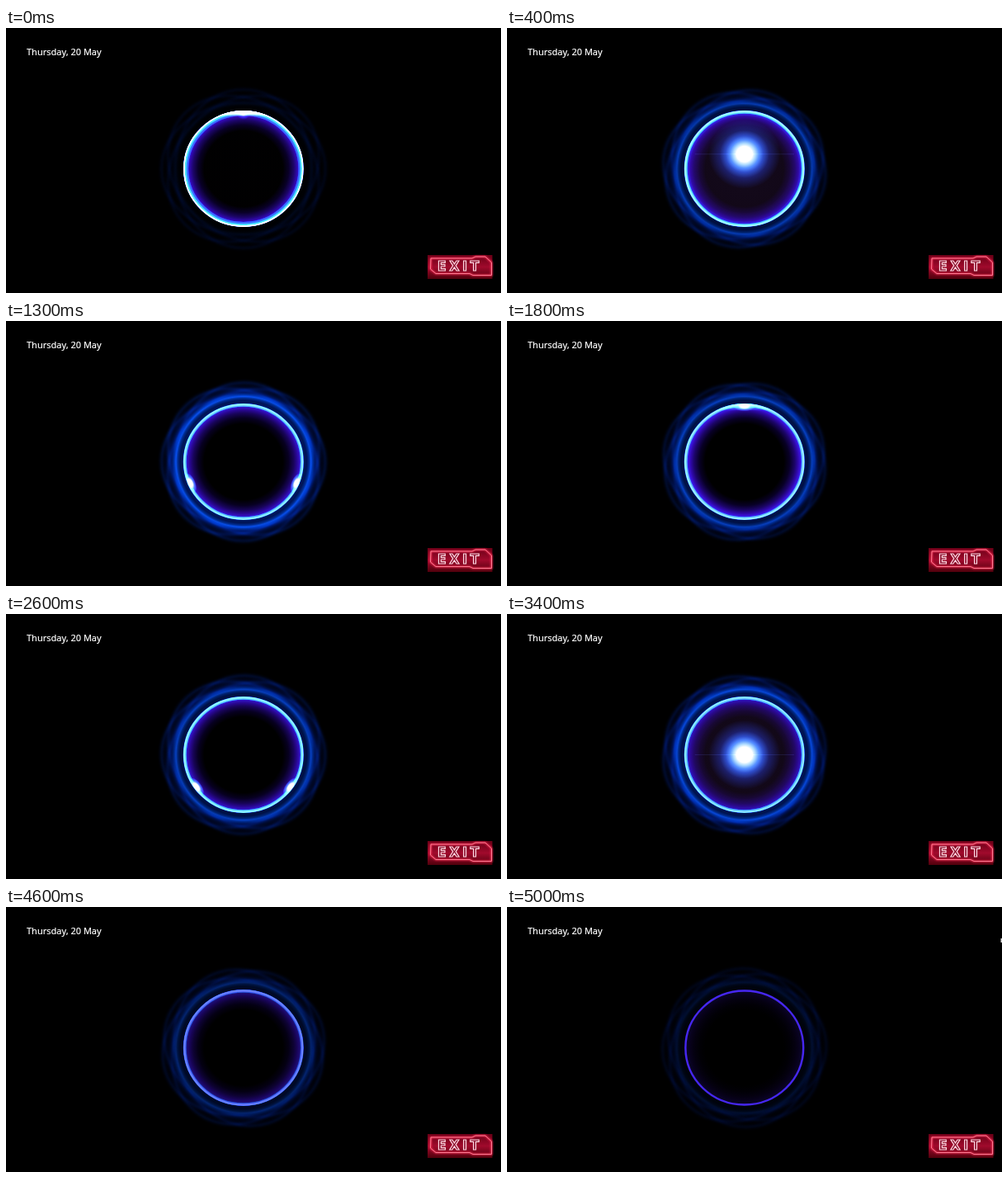
Animation, 600 px wide and 321 px high, one loop 5100 ms. Source, as an HTML page with a canvas:

```html
<!DOCTYPE html>
<html lang="en">
<head>
<meta charset="utf-8">
<title>Energy ring</title>
<style>
  html, body { margin: 0; width: 100%; height: 100%; overflow: hidden; background: #000; }
  canvas, svg { position: absolute; left: 0; top: 0; display: block; }
  .date { font: 11px "Noto Sans", "Open Sans", sans-serif; fill: #fff; stroke: #fff; stroke-width: .2; }
  .exit { font: bold 15.5px "DejaVu Sans", sans-serif; letter-spacing: 3.8px; }
</style>
</head>
<body>
<canvas id="stage" width="600" height="321"></canvas>
<svg width="600" height="321" viewBox="0 0 600 321">
  <defs>
    <linearGradient id="panel" x2="0" y2="1">
      <stop offset="0" stop-color="#6a0016"/>
      <stop offset=".5" stop-color="#a00a2c"/>
      <stop offset="1" stop-color="#50000c"/>
    </linearGradient>
    <filter id="soft"><feGaussianBlur stdDeviation="1"/></filter>
    <path id="frame" d="M515 279H565L569 277H581L588.500 284V299.500H566L562 297.500H521L514.500 292Z"/>
  </defs>
  <text class="date" x="25" y="33">Thursday, 20 May</text>
  <rect x="511" y="275" width="78.500" height="29" fill="url(#panel)"/>
  <g fill="none">
    <use href="#frame" stroke="#f02c50" stroke-width="2.2" filter="url(#soft)"/>
    <use href="#frame" stroke="#ff7a92" stroke-width="1"/>
  </g>
  <text class="exit" x="523" y="294" fill="#8d1230" stroke="#ffd9e2" stroke-width="1.2">EXIT</text>
  <rect id="cursor" x="598.500" y="38" width="1.500" height="5" fill="#ddd"/>
</svg>
<script>
const LOOP = 5100, STEP = 100, R = 70, TAU = Math.PI * 2;
const ctx = document.getElementById('stage').getContext('2d');
const cursor = document.getElementById('cursor');

// time, halo, core, glow, flash
const LEVELS = [
  [0, .03, .6, 1, 1],
  [400, .6, .95, .9, .1],
  [800, 1, .95, .75, 0],
  [1800, .65, .85, 1, 0],
  [2600, .65, .95, .85, 0],
  [3400, .75, .85, .8, 0],
  [4100, .65, .85, .95, 0],
  [5000, .12, 0, .15, 0]
];
// time, height relative to the centre, strength
const BALL = [
  [0, -68, 1], [800, 32.500, 1], [1000, 68, .8], [1100, 70, 0],
  [2900, 70, 0], [3000, 64, .8], [3400, 0, 1], [3600, 0, .8], [3900, 0, 0]
];

const clamp = (v, a = 0, b = 1) => Math.min(b, Math.max(a, v));

function sample(rows, t) {
  const i = rows.findIndex(row => row[0] > t);
  if (i < 0) return rows[rows.length - 1].slice(1);
  const a = rows[i - 1], b = rows[i], k = (t - a[0]) / (b[0] - a[0]);
  return a.slice(1).map((v, n) => v + (b[n + 1] - v) * k);
}

function layer(alpha, paint) {
  if (alpha <= 0) return;
  ctx.save();
  ctx.globalAlpha = alpha;
  paint();
  ctx.restore();
}

function circle(x, y, r) {
  ctx.beginPath();
  ctx.arc(x, y, r, 0, TAU);
}

function disc(r, stops) {
  const g = ctx.createRadialGradient(0, 0, 0, 0, 0, r);
  for (const [at, color] of stops) g.addColorStop(at / r, color);
  ctx.fillStyle = g;
  circle(0, 0, r);
  ctx.fill();
}

function ring(r, width, color) {
  ctx.lineWidth = width;
  ctx.strokeStyle = color;
  circle(0, 0, r);
  ctx.stroke();
}

function halo(level, turn) {
  layer(level, () => disc(97, [
    [69, '#000'], [70, '#002078'], [74, '#001868'], [77, '#0034a8'], [79, '#0a55f5'],
    [81, '#0034a8'], [84, '#001660'], [90, '#000620'], [97, '#000']
  ]));
  layer(.3 + .5 * level, () => {
    ctx.filter = 'blur(1px)';
    ctx.rotate(turn);
    for (let i = 0; i < 4; i++) {
      ctx.rotate(TAU / 8);
      ctx.beginPath();
      ctx.ellipse(0, 0, 96, 80, 0, 0, TAU);
      ctx.lineWidth = 6;
      ctx.strokeStyle = 'rgba(0,35,140,.2)';
      ctx.stroke();
      ctx.lineWidth = 1.5;
      ctx.strokeStyle = 'rgba(0,50,170,.35)';
      ctx.stroke();
    }
  });
}

function body(core, glow, flash) {
  layer(glow, () => disc(71, [
    [46, '#000'], [53, '#080026'], [59, '#1c0568'], [63, '#3008ac'],
    [66, '#3a16e4'], [69.500, '#4630ff'], [71, '#000']
  ]));
  layer(.85 * (1 - flash), () => ring(69, 2.300, '#4624ee'));
  layer(core, () => {
    ring(68.400, 3.200, '#10b0f0');
    ring(70, 1, '#3070a0');
  });
  layer(flash, () => {
    ring(66.500, 4, '#0060b8');
    ring(69.500, 1.500, '#fff');
  });
}

// Liquid joining the ball to the nearer edge; d is the ball's distance from it
function pool(side, d, alpha, flash) {
  const h = 4 + 14 * d / 37, y = R - h, tip = Math.min(R - d + 2, y);
  layer(alpha, () => {
    ctx.scale(1, side);
    const g = ctx.createLinearGradient(0, tip - 3, 0, R);
    const rgb = [40 + 215 * flash, 180 + 75 * flash, 255].join();
    g.addColorStop(0, `rgba(${rgb},.35)`);
    g.addColorStop(.55, `rgba(${rgb},.85)`);
    g.addColorStop(1, `rgb(${rgb})`);
    ctx.fillStyle = g;
    ctx.filter = `blur(${clamp(h / 8, .8, 2)}px)`;
    ctx.beginPath();
    ctx.moveTo(-R, y - h / 3);
    ctx.quadraticCurveTo(-48, y, -32, y);
    ctx.quadraticCurveTo(-18, y, -18, tip);
    ctx.lineTo(18, tip);
    ctx.quadraticCurveTo(18, y, 32, y);
    ctx.quadraticCurveTo(48, y, R, y - h / 3);
    ctx.lineTo(R, 80);
    ctx.lineTo(-R, 80);
    ctx.fill();
  });
}

function ball(y, strength, flash) {
  if (strength <= 0) return;
  const d = R - Math.abs(y), size = clamp(d / 33, .2);
  pool(y < 0 ? -1 : 1, d, strength * clamp((50 - d) / 12), flash);
  layer(strength * size * size, () => disc(66, [[0, '#140a1c'], [54, '#120818'], [66, '#000']]));
  layer(strength, () => {
    ctx.translate(0, y);
    ctx.scale(size, size);
    ctx.fillStyle = 'rgba(60,80,160,.2)';
    ctx.fillRect(-58, -.5, 116, 1);
    disc(42, [
      [0, '#fff'], [9, '#f4fcff'], [13, '#98d0ff'], [17, '#4488f0'],
      [22, '#1c44b0'], [29, '#0a1650'], [42, '#000']
    ]);
  });
}

function sparks(t) {
  if (t < 1000 || t > 2950) return;
  const angle = t < 1800 ? Math.PI * (1800 - t) / 800 : Math.PI * (t - 1800) / 1150;
  pool(-1, 6, .75 * clamp(1 - angle / .4), 0);
  for (const side of [-1, 1]) layer(angle < .1 ? .4 : 1, () => {
    ctx.rotate(side * angle);
    ctx.translate(0, -67);
    ctx.scale(1.4, .65);
    disc(9, [[0, '#fff'], [3, '#d8f4ff'], [5.500, '#2878c0'], [9, '#000']]);
  });
}

function draw(t) {
  const [glowOut, core, glow, flash] = sample(LEVELS, t);
  const [y, strength] = sample(BALL, t);
  ctx.setTransform(1, 0, 0, 1, 0, 0);
  ctx.globalCompositeOperation = 'source-over';
  ctx.fillStyle = '#000';
  ctx.fillRect(0, 0, 600, 321);
  ctx.globalCompositeOperation = 'lighter';
  ctx.setTransform(1.035, 0, 0, 1, 287.800, 170.500);
  halo(glowOut, t / LOOP * TAU / 2);
  body(core, glow, flash);
  ctx.save();
  circle(0, 0, 70.500);
  ctx.clip();
  ball(y, strength, flash);
  sparks(t);
  ctx.restore();
  cursor.style.display = t >= 5000 ? '' : 'none';
}

let start = null;
function tick(now) {
  start ??= now;
  draw(Math.floor((now - start) % LOOP / STEP) * STEP);
  requestAnimationFrame(tick);
}
draw(0);
requestAnimationFrame(tick);
</script>
</body>
</html>
```
